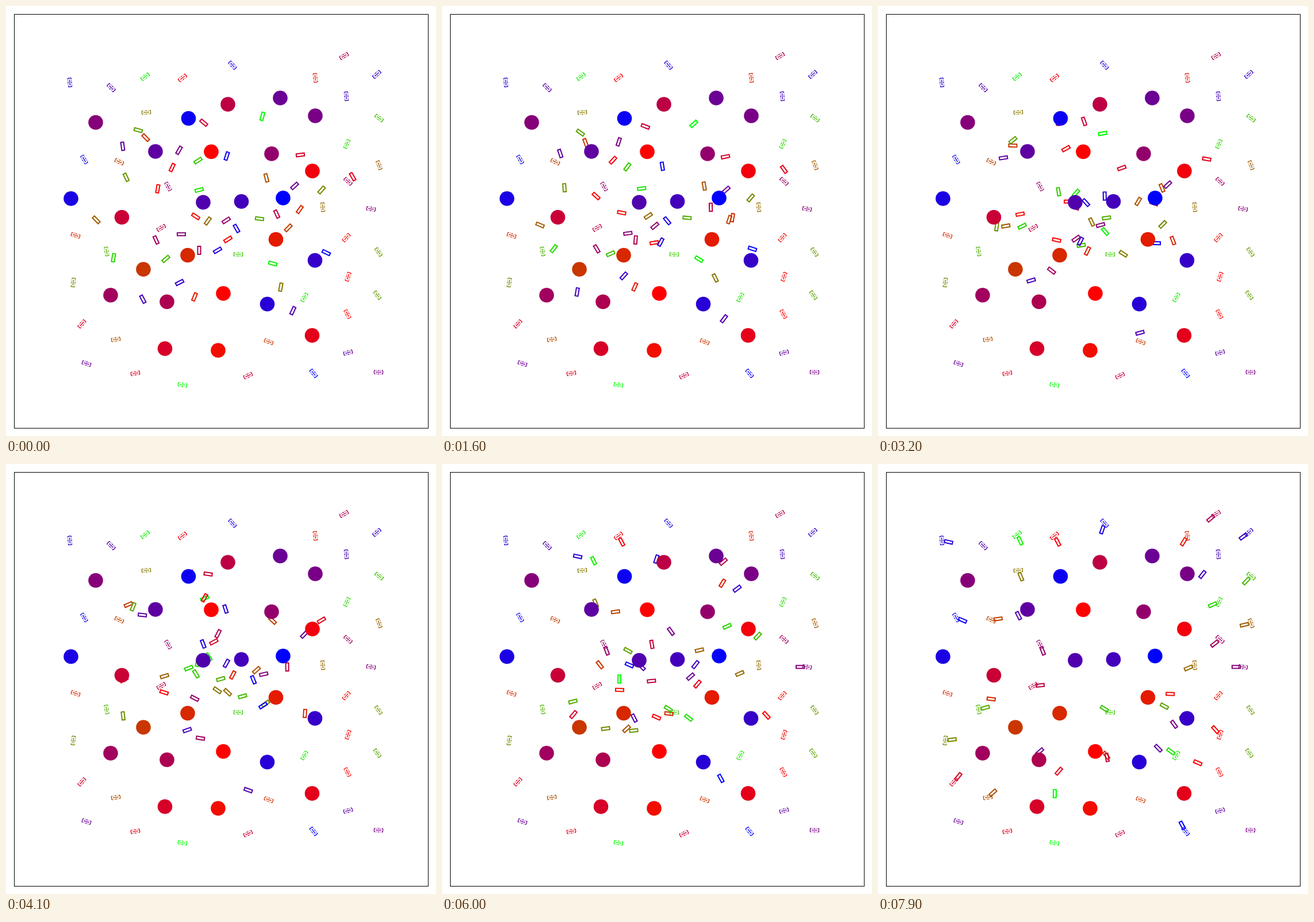
Write an HTML page with a canvas that moves like this. It is 748 px wide and 748 px high and loops after 8 s.

```html
<!DOCTYPE html>
<html lang="en">
<head>
<meta charset="utf-8">
<title>Agents among obstacles</title>
<style>
  html, body { margin: 0; width: 100%; height: 100%; overflow: hidden; background: #fff; }
  canvas { display: block; width: 100vw; height: 100vh; }
</style>
</head>
<body>
<canvas id="stage" width="748" height="748"></canvas>
<script>
const ctx = document.getElementById('stage').getContext('2d');
const LOOP = 8000, STEP = 100, RAMP = 20;
const GATHER_STEPS = 51;  // time from the start to the gathering point
const CRUISE = 10.5;      // pixels per step on the way to the goal
const STOP_SHORT = 12;    // agents halt just beside their goal
const RAD = Math.PI / 180;

// Two colour ramps leave red: one ends in green, the other in blue.
function rampColor(index, toBlue) {
  const end = Math.round(255 * index / (RAMP - 1));
  return toBlue ? `rgb(${255 - end},0,${end})` : `rgb(${255 - end},${end},0)`;
}

const agents = [], obstacles = [];

// start and goal are x, y, heading in degrees; the gathering point is x, y
function agent([sx, sy, heading], [gx, gy], goal) {
  const index = agents.length;
  const distance = Math.hypot(goal[0] - gx, goal[1] - gy);
  const aim = Math.atan2(goal[1] - gy, goal[0] - gx);
  const ux = Math.cos(heading * RAD), uy = Math.sin(heading * RAD);
  const forward = ux * (gx - sx) + uy * (gy - sy) < 0 ? -50 : 50;
  agents.push({
    goal, distance, aim, gather: [gx, gy],
    xs: [sx, sx + ux * forward, gx - Math.cos(aim) * 90, gx],
    ys: [sy, sy + uy * forward, gy - Math.sin(aim) * 90, gy],
    color: rampColor(index % RAMP, index >= RAMP)
  });
}

function obstacleRow(toBlue, ...points) {
  points.forEach(([x, y], i) => obstacles.push({ x, y, color: rampColor(i, toBlue) }));
}

// red to green
agent([264,318,-80], [508,375], [595,471,-72]);
agent([330,366,33], [225,390], [592,403,-50]);
agent([328,506,-68], [444,279], [538,125,83]);
agent([511,354,-55], [478,445], [121,399,18]);
agent([243,229,45], [223,283], [457,584,20]);
agent([491,386,-45], [385,246], [197,271,25]);
agent([453,299,75], [383,404], [191,580,-8]);
agent([157,372,45], [366,343], [649,277,70]);
agent([351,374,-55], [441,398], [551,350,85]);
agent([478,489,-80], [299,320], [244,185,-5]);
agent([549,320,-48], [368,450], [117,481,-82]);
agent([209,298,65], [250,473], [648,428,55]);
agent([230,216,15], [250,284], [646,503,55]);
agent([441,370,7], [309,392], [175,427,80]);
agent([278,440,-40], [491,360], [649,195,38]);
agent([334,269,-33], [391,424], [404,432,2]);
agent([187,438,-80], [419,316], [593,240,-65]);
agent([336,320,-14], [361,392], [519,507,-60]);
agent([464,448,15], [300,244], [242,123,-38]);
agent([446,192,-75], [309,290], [307,659,8]);

// red to blue
agent([386,406,-32], [296,407], [594,536,62]);
agent([289,281,-65], [335,179], [307,125,-38]);
agent([603,297,60], [499,319], [225,639,-10]);
agent([512,259,-7], [282,371], [132,553,-48]);
agent([344,203,40], [351,231], [421,643,-25]);
agent([471,362,65], [448,370], [270,386,-30]);
agent([336,425,-90], [425,224], [588,87,-30]);
agent([261,407,65], [406,455], [595,305,42]);
agent([383,373,-33], [300,360], [282,314,62]);
agent([305,397,0], [545,353], [635,353,8]);
agent([301,251,-60], [349,223], [648,637,2]);
agent([502,313,-42], [496,315], [140,622,18]);
agent([203,244,82], [288,293], [595,603,-15]);
agent([499,530,-65], [372,517], [183,142,45]);
agent([238,510,62], [389,415], [592,157,85]);
agent([302,481,-27], [446,267], [645,119,-42]);
agent([368,425,-30], [318,179], [111,133,85]);
agent([401,387,60], [346,245], [394,103,50]);
agent([384,261,-72], [403,383], [136,267,60]);
agent([557,429,25], [445,473], [535,639,52]);

obstacleRow(false, [378,500], [369,599], [469.5,406], [316,433.5], [239,458]);
obstacleRow(true,
  [357,253.5], [533,287], [532.5,573], [276.5,596], [201.5,367.5], [386,171], [280,514.5],
  [182,503], [462,257], [156,202.5], [538,191], [477,160], [260,253], [343,341.5],
  [409.5,340], [537.5,442.5], [454.5,518.5], [113,335], [317.5,195.5], [482,334]);

const bezier = ([a, b, c, d], t) =>
  a * (1 - t) ** 3 + 3 * b * t * (1 - t) ** 2 + 3 * c * t * t * (1 - t) + d * t ** 3;
const bezierSlope = ([a, b, c, d], t) =>
  (b - a) * (1 - t) ** 2 + 2 * (c - b) * t * (1 - t) + (d - c) * t * t;

// Speed up along a curve to the gathering point, then cruise straight to the goal.
function poseAt({ xs, ys, gather, aim, distance }, step) {
  if (step < GATHER_STEPS) {
    const t = (step / GATHER_STEPS) ** 1.8;
    return [bezier(xs, t), bezier(ys, t), Math.atan2(bezierSlope(ys, t), bezierSlope(xs, t)) / RAD];
  }
  const run = Math.max(0, Math.min(CRUISE * (step - GATHER_STEPS), distance - STOP_SHORT));
  return [gather[0] + Math.cos(aim) * run, gather[1] + Math.sin(aim) * run, aim / RAD];
}

function placed([x, y, angle], draw) {
  ctx.save();
  ctx.translate(x, y);
  ctx.rotate(angle * RAD);
  draw();
  ctx.restore();
}

function line(x0, y0, x1, y1) {
  ctx.beginPath();
  ctx.moveTo(x0, y0);
  ctx.lineTo(x1, y1);
  ctx.stroke();
}

// Dash-dotted long sides, solid ends and a bar along the middle
function drawGoal() {
  ctx.lineWidth = 1.3;
  for (const side of [-1, 1]) {
    line(7.5 * side, -3, 7.5 * side, 3);
    ctx.setLineDash([2, 1.5, 1, 1.5, 3, 1.5, 1, 1.5]);
    line(-7.5, 3 * side, 7.5, 3 * side);
    ctx.setLineDash([]);
  }
  line(-5, 0, 5, 0);
}

function drawBody() {
  ctx.lineWidth = 2;
  ctx.strokeRect(-7, -2.5, 14, 5);
}

function render(time) {
  const step = Math.max(0, Math.floor(time % LOOP / STEP) - 1);
  ctx.fillStyle = '#fff';
  ctx.fillRect(0, 0, 748, 748);
  ctx.strokeStyle = '#000';
  ctx.lineWidth = 1;
  ctx.strokeRect(14.5, 14.5, 720, 720);

  for (const a of agents) {
    ctx.strokeStyle = a.color;
    placed(a.goal, drawGoal);
  }
  for (const a of agents) {
    ctx.strokeStyle = a.color;
    placed(poseAt(a, step), drawBody);
  }
  for (const { x, y, color } of obstacles) {
    ctx.fillStyle = color;
    ctx.beginPath();
    ctx.arc(x, y, 12.8, 0, 2 * Math.PI);
    ctx.fill();
  }
}

const start = performance.now();
function tick() {
  render(performance.now() - start);
  requestAnimationFrame(tick);
}
tick();
</script>
</body>
</html>
```
